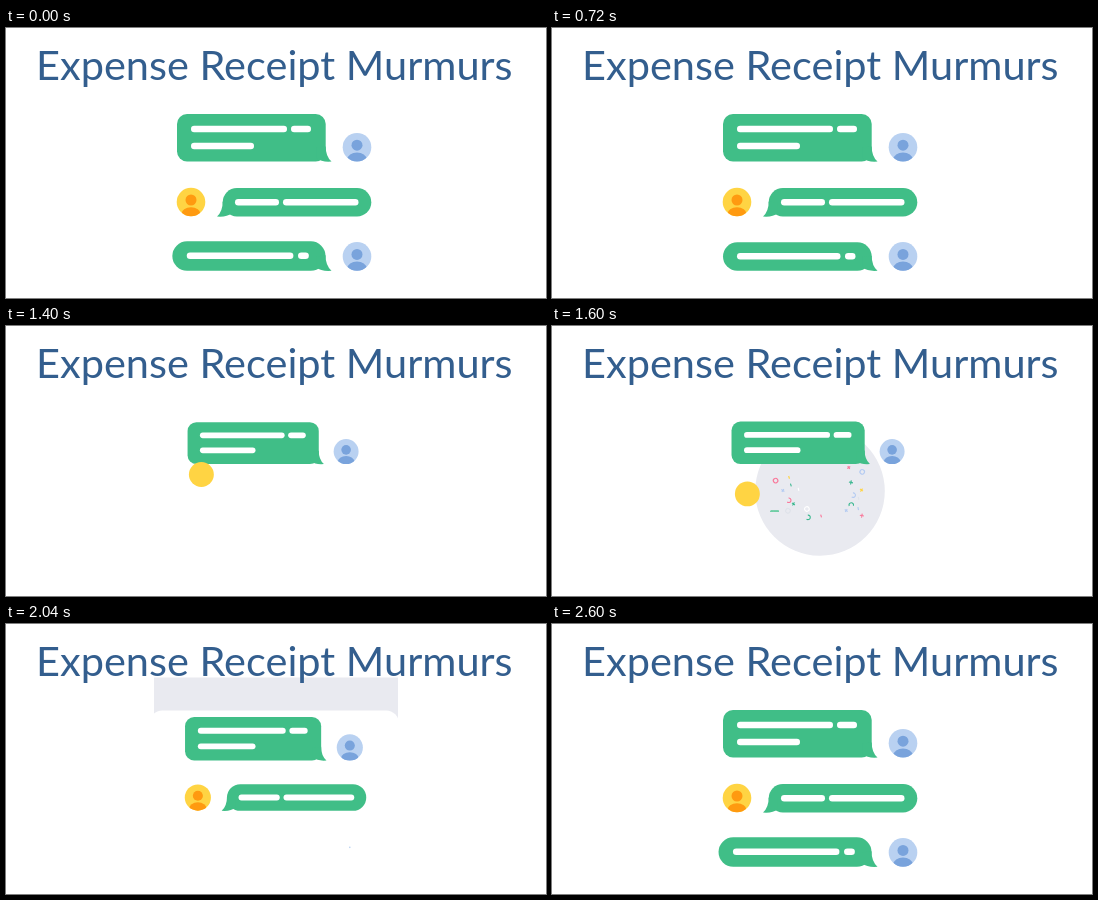
An HTML page for the animation above (2640 ms loop, 540x270 px).

```html
<!DOCTYPE html>
<html lang="en">
<head>
<meta charset="utf-8">
<title>Chat bubbles</title>
<style>
html, body { margin: 0; width: 100%; height: 100%; overflow: hidden; background: #fff; }
svg { display: block; width: 100vw; height: 100vh; }
text { font: 400 41.5px Lato, sans-serif; fill: #335e8e; }
.bubble { fill: #40be87; }
.line { stroke: #fff; stroke-width: 6.4; stroke-linecap: round; }
.blue { fill: #b9d1f1; }
.blue .person { fill: #79a3dc; }
.yellow { fill: #ffd443; }
.yellow .person { fill: #ff9a10; }
.bit { fill: none; stroke-width: 2; }
</style>
</head>
<body>
<svg viewBox="0 0 540 270">
  <defs>
    <clipPath id="box"><rect x="148" y="53.5" width="244" height="217"/></clipPath>
    <clipPath id="face"><circle r="14.3"/></clipPath>
  </defs>
  <g clip-path="url(#box)">
    <circle id="wash" cx="268" cy="165" fill="#e9eaf0"/>
    <g id="burst"></g>
    <rect id="panel" rx="13" height="500" fill="#fff"/>
  </g>
  <g id="pop"></g>
  <g id="scene"></g>
  <text x="30" y="52">Expense Receipt Murmurs</text>
</svg>
<script>
const LOOP = 2640, START = 1200;
const $ = id => document.getElementById(id);
const set = (el, attrs) => { for (const k in attrs) el.setAttribute(k, attrs[k]); };
const add = (parent, tag, attrs) => {
  const el = document.createElementNS('http://www.w3.org/2000/svg', tag);
  set(el, attrs);
  return parent.appendChild(el);
};
const ramp = (t, from, to) => Math.min(1, Math.max(0, (t - from) / (to - from)));
const easeInOut = p => p < .5 ? 4 * p ** 3 : 1 - 4 * (1 - p) ** 3;
const easeOut = p => 1 - (1 - p) ** 3;

// Swells past full size, then settles
const GROW = [[0, .06], [80, .6], [160, 1], [240, 1.023], [350, 1.031], [440, 1.024],
  [560, 1.001], [660, .994], [840, 1], [1080, 1]];
function grow(t) {
  if (t < 0) return 0;
  const i = GROW.findIndex(k => k[0] > t);
  if (i < 0) return 1;
  const [t0, a] = GROW[i - 1], [t1, b] = GROW[i];
  return a + (b - a) * (t - t0) / (t1 - t0);
}

function makeBubble({ x, y, w, h, r, tip, lines, start }) {
  const g = add($('scene'), 'g', { class: 'bubble' });
  const base = y + h, right = tip > x;
  const edge = right ? x + w : x, d = right ? 1 : -1;
  add(g, 'rect', { x, y, width: w, height: h, rx: r });
  add(g, 'path', { d: `M${edge} ${base - 15}Q${edge} ${base - 5} ${tip} ${base}` +
    `Q${edge - d * 4} ${base + .8} ${edge - d * 9} ${base - 3.2}L${edge - d * 9} ${base - 14}Z` });
  for (const [a, b, ly] of lines)
    add(g, 'line', { class: 'line', x1: a + 3.2, x2: b - 3.2, y1: ly, y2: ly });
  return { g, tip, base, start };
}

function makeAvatar(cls) {
  const g = add($('scene'), 'g', { class: cls });
  add(g, 'circle', { r: 14.3 });
  const clip = add(g, 'g', { 'clip-path': 'url(#face)' });
  const person = add(clip, 'g', { class: 'person' });
  add(person, 'circle', { cy: -2, r: 5.5 });
  add(person, 'ellipse', { cy: 12, rx: 9.6, ry: 6.8 });
  return { g, person };
}

const bubbles = [
  { x: 171, y: 86, w: 148.7, h: 47.5, r: 10, tip: 325.5, start: 1200,
    lines: [[185, 281, 101], [285, 305, 101], [185, 248, 118]] },
  { x: 216.7, y: 160, w: 148.6, h: 28.5, r: 14.2, tip: 211, start: 1600,
    lines: [[229, 273, 174.3], [277, 352.5, 174.3]] },
  { x: 171, y: 214.2, w: 148.7, h: 28.6, r: 14.3, tip: 325.5, start: 2280,
    lines: [[185, 288.5, 228.2], [293, 303.5, 228.2]] }
].map(makeBubble);
const [first, second, third] = ['blue', 'yellow', 'blue'].map(makeAvatar);

const INK = { g: '#3bb890', p: '#f9799b', b: '#b4cbf2', y: '#ffd443', w: '#fff', s: '#dfe3ea' };
const SHAPE = {
  plus: 'M-3.2 0H3.2M0-3.2V3.2',
  cross: 'M-2.6-2.6L2.6 2.6M-2.6 2.6L2.6-2.6',
  ring: 'M-4 0A4 4 0 1 1 4 0A4 4 0 1 1-4 0',
  arc: 'M-3.5-2A4 4 0 1 1 1 3.8',
  dash: 'M-1.6 2L1.6-2',
  flat: 'M-2.5-1L2.5 1',
  square: 'M-3-3H3V3H-3Z',
  wedge: 'M-2-3L3 0L-2 3Z'
};
const makeBits = (parent, list) => list.map(([x, y, shape, ink]) => ({
  x, y, el: add(parent, 'path', { class: 'bit', d: SHAPE[shape], stroke: INK[ink] })
}));

// Offsets from the burst centres
const bits = makeBits($('burst'), [
  [79, -70, 'plus', 'p'], [116, -58, 'ring', 'b'], [85, -29, 'cross', 'g'],
  [-80, -22, 'dash', 'g'], [-59, -10, 'flat', 'w'], [-102, -7, 'plus', 'b'],
  [-86, 20, 'arc', 'p'], [-73, 30, 'plus', 'g'], [-36, 44, 'ring', 'w'],
  [-88, 49, 'ring', 's'], [-33, 67, 'arc', 'g'], [3, 63, 'dash', 'p'],
  [115, 62, 'cross', 'p'], [72, 48, 'plus', 'b'], [105, 43, 'flat', 'b'],
  [86, 33, 'arc', 'g'], [91, 6, 'arc', 'b'], [114, -8, 'plus', 'y'],
  [-122, -34, 'ring', 'p'], [-85, -43, 'dash', 'y'], [106, 15, 'flat', 's']
]);
const sparks = makeBits($('pop'), [
  [-18, -7, 'wedge', 'g'], [-19, 0, 'ring', 'g'], [-16, 5, 'square', 'g'],
  [5, 11, 'plus', 'g'], [14, 7, 'cross', 'g'], [18, -3, 'plus', 'g']
]);

function placeBits(list, cx, cy, spread, drop, size, turn) {
  list.forEach(({ x, y, el }, i) => set(el, { transform:
    `translate(${cx + x * spread} ${cy + y * spread + drop}) rotate(${turn * (i % 2 ? 1 : -1)}) scale(${size})` }));
}

// Height above rest: a fall, then two bounces
function hop(t) {
  const arc = (a, b, h) => h * 4 * ramp(t, a, b) * (1 - ramp(t, a, b));
  return 86 * (1 - ramp(t, 1200, 1330) ** 2) + arc(1330, 1510, 26) + arc(1510, 1650, 6);
}

function showAvatar(a, x, y, size, personAt, t, stretch = 1) {
  set(a.g, { transform: `translate(${x} ${y}) scale(${size / stretch ** .9} ${size * stretch ** .3})` });
  set(a.person, { transform: `translate(0 14) scale(${easeOut(ramp(t, personAt, personAt + 130))}) translate(0 -14)` });
}

function draw(now) {
  let t = now % LOOP;
  if (t < START) t += LOOP;

  const zoom = .872 + .128 * easeInOut(ramp(t, 1760, 2400));
  set($('scene'), { transform: `translate(266 169) scale(${zoom}) translate(-266 -169)` });

  for (const { g, tip, base, start } of bubbles)
    set(g, { transform: `translate(${tip} ${base}) scale(${grow(t - start)}) translate(${-tip} ${-base})` });

  const lift = hop(t);
  const fall = 1 - ramp(t, 1200, 1330);
  showAvatar(first, 351, 119.2, 1, 1260, t);
  showAvatar(second, 185 + 2.5 * fall, 174 - lift / .872, 1, 1800, t, 1 + .18 * fall);
  showAvatar(third, 351, 228.4, easeOut(ramp(t, 2036, 2270)), 2340, t);

  const rise = .5286 * (t - 1760);
  const busy = t < 2280;
  set($('wash'), { r: busy ? Math.max(0, .8 * (t - 1520)) : 0 });
  const widen = 3 * ramp(t, 1760, 2040);
  set($('panel'), { x: 146.5 - widen, width: 243.5 + 2 * widen, y: 235 - rise });

  const after = Math.max(0, t - 1760);
  const spread = ramp(t, 1510, 1760) + .12 * ramp(t, 1760, 2040);
  const size = t < 1510 || !busy ? 0 : .4 + .6 * ramp(t, 1540, 1760);
  placeBits(bits, 268, 167, spread, after ** 2 * .0006, size, (t - 1760) * .35);

  const fade = ramp(t, 1200, 1360);
  placeBits(sparks, 203, 155, 1 + .5 * easeOut(fade), 4 * fade, .55 * (1 - fade), 90 * fade);
}

const begin = performance.now();
function tick() {
  draw(performance.now() - begin);
  requestAnimationFrame(tick);
}
tick();
</script>
</body>
</html>
```
